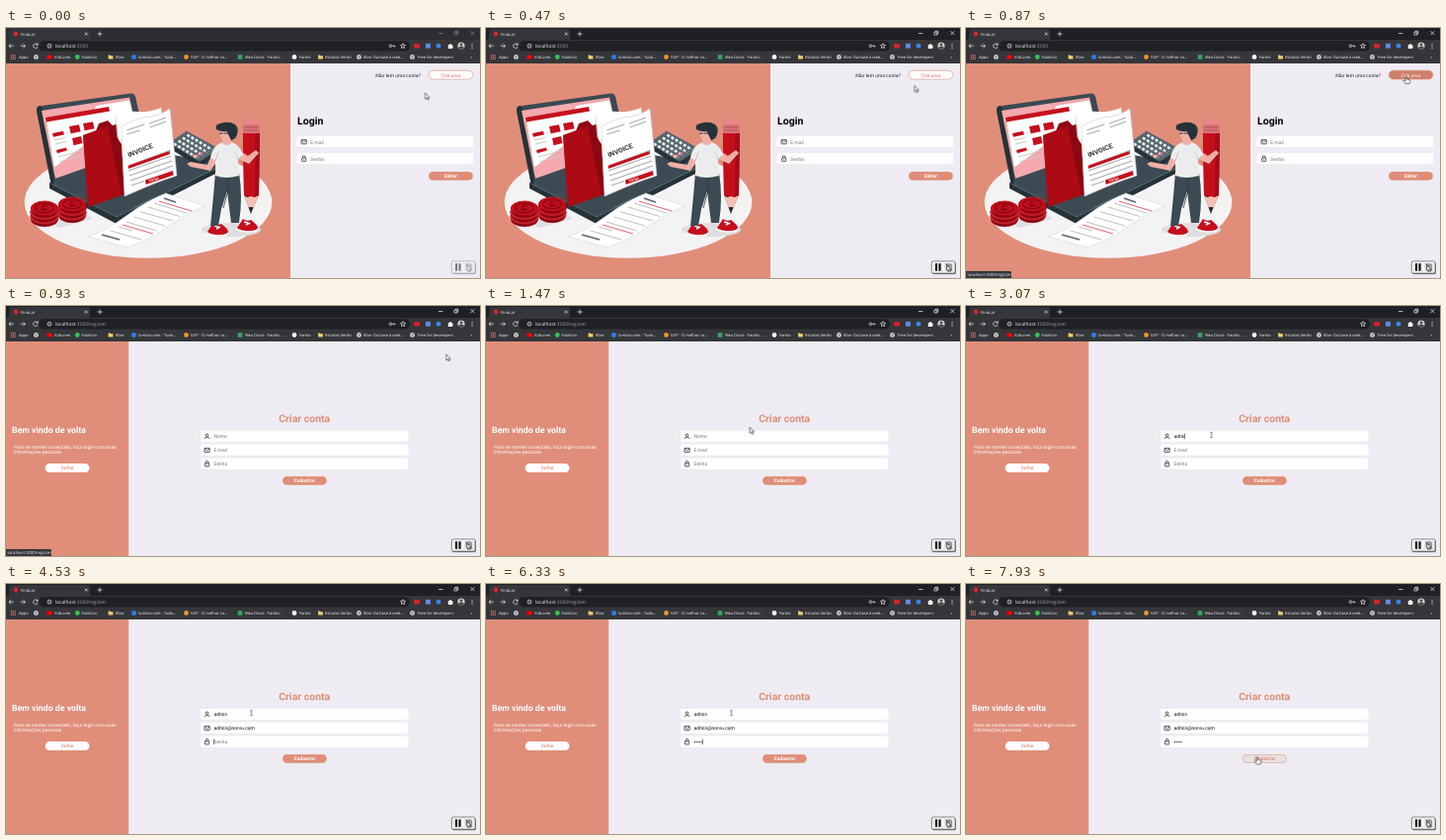
An HTML page that plays this animation: 480 px wide and 254 px high, repeating every 8 s.

```html
<!DOCTYPE html>
<html lang="pt-BR">
<head>
<meta charset="utf-8">
<title>Criar conta</title>
<style>
html, body { margin: 0; width: 100%; height: 100%; overflow: hidden; background: #eeecf2; }
svg { display: block; width: 100vw; height: 100vh; }
text { font-family: Roboto, sans-serif; font-size: 4.92px; text-rendering: geometricPrecision; white-space: pre; }
.ui text { font-family: "Open Sans", "Noto Sans", sans-serif; fill: #f4f5f6; }
.marks text { font-size: 4px; font-weight: 500; }
.line { fill: none; stroke: #f1f2f3; stroke-width: .7; }
.ink { fill: none; stroke: #222; stroke-width: .75; }
.hint { fill: #777; }
.mid { text-anchor: middle; }
.b { font-weight: 700; }
.salmon { fill: #e08e79; }
.w { fill: #fff; }
.red { fill: #c40f1d; }
.deep { fill: #8c0812; }
.fold { fill: #ac0b15; }
.slate { fill: #3b4a53; }
.dark { fill: #263238; }
.skin { fill: #f0b0a6; }

/* 8 s loop: 1% = 80 ms */
.t { animation: 8s step-end infinite; }
.strip { fill: #2d2e31; animation-name: strip; }
.controls { opacity: .45; animation-name: controls; }
.login { animation-name: login; }
.reg { opacity: 0; animation-name: reg; }
.key { animation-name: key; }
.status { opacity: 0; animation-name: status; }
.popup { opacity: 0; animation-name: popup; }
.hint1 { animation-name: hint1; }
.hint2 { animation-name: hint2; }
.hint3 { animation-name: hint3; }
.mail { opacity: 0; animation-name: mail; }
.name { animation-name: name; }
.pass { animation-name: pass; }
.caret { opacity: 0; animation-name: caret; }
.arrow { animation-name: arrow; }
.hand { opacity: 0; animation-name: hand; }
.beam { opacity: 0; animation-name: beam; }
.move { animation: move 8s ease-in-out infinite; }
.rec { animation: rec 8s linear infinite; }
.go { fill: #fff; animation: go 8s linear infinite; }
.goText { fill: #e08e79; animation: goText 8s linear infinite; }
.send { fill: #e08e79; animation: send 8s linear infinite; }
.sendText { fill: #fff; animation: sendText 8s linear infinite; }

@keyframes strip { 1.6% { fill: #1f2023 } }
@keyframes controls { 1.6% { opacity: 1 } }
@keyframes login { 11.6% { opacity: 0 } }
@keyframes reg { 11.6% { opacity: 1 } }
@keyframes key { 27.4% { opacity: 0 } 66.6% { opacity: 1 } }
@keyframes status { 9.1% { opacity: 1 } 15% { opacity: .5 } 15.8% { opacity: 0 } }
@keyframes popup { 23.3% { opacity: .5 } 24.1% { opacity: 1 } 27.4% { opacity: 0 } }
@keyframes hint1 { 27.4% { opacity: 0 } }
@keyframes hint2 { 50.8% { opacity: 0 } }
@keyframes hint3 { 65.8% { opacity: 0 } }
@keyframes mail { 50.8% { opacity: 1 } }
@keyframes name {
  27.4% { transform: translateX(2.7px) } 29.9% { transform: translateX(5.4px) }
  34.1% { transform: translateX(9.8px) } 38.3% { transform: translateX(11px) }
  40.8% { transform: translateX(13.7px) }
}
@keyframes pass {
  65.8% { transform: translateX(2.2px) } 69.1% { transform: translateX(4.4px) }
  73.3% { transform: translateX(6.6px) } 79.1% { transform: translateX(8.8px) }
}
@keyframes caret {
  23.3% { opacity: 1; transform: none }
  27.4% { opacity: 1; transform: translate(2.7px, 0) }
  29.9% { opacity: 1; transform: translate(5.4px, 0) }
  34.1% { opacity: 1; transform: translate(9.8px, 0) }
  38.3% { opacity: 1; transform: translate(11px, 0) }
  40.8% { opacity: 1; transform: translate(13.7px, 0) }
  43.3% { opacity: 1; transform: translate(0, 14px) }
  49.9% { opacity: 0; transform: translate(0, 14px) }
  50.8% { opacity: 1; transform: translate(41.6px, 14px) }
  56.6% { opacity: 1; transform: translate(0, 28px) }
  63.3% { opacity: 0; transform: translate(0, 28px) }
  65.8% { opacity: 1; transform: translate(2.2px, 28px) }
  69.1% { opacity: 1; transform: translate(4.4px, 28px) }
  73.3% { opacity: 1; transform: translate(6.6px, 28px) }
  79.1% { opacity: 1; transform: translate(9px, 28px) }
  85.8% { opacity: 0; transform: translate(9px, 28px) }
  92.4% { opacity: 1; transform: translate(9px, 28px) }
  98.3% { opacity: 0; transform: translate(9px, 28px) }
}
@keyframes move {
  0%, 1.6% { transform: translate(424.5px, 66px) }
  10.8%, 12.5% { transform: translate(445.7px, 49px) }
  20%, 90% { transform: translate(248.5px, 131px) }
  98.4%, 100% { transform: translate(295px, 175.5px) }
}
@keyframes arrow { 9.1% { opacity: 0 } 11.6% { opacity: 1 } 19% { opacity: 0 } 95% { opacity: 1 } 95.8% { opacity: 0 } }
@keyframes hand { 9.1% { opacity: 1 } 11.6% { opacity: 0 } 95.8% { opacity: 1 } }
@keyframes beam { 19% { opacity: 1 } 95% { opacity: 0 } }
@keyframes rec { 0%, 1.6% { opacity: .5 } 5%, 100% { opacity: 1 } }
@keyframes go { 0%, 9.1% { fill: #fff } 10.8%, 100% { fill: #cf7f6b } }
@keyframes goText { 0%, 9.1% { fill: #e08e79 } 10.8%, 100% { fill: #fbdcd4 } }
@keyframes send { 0%, 95.8% { fill: #e08e79 } 98%, 100% { fill: #e7e0e2 } }
@keyframes sendText { 0%, 95.8% { fill: #fff } 98%, 100% { fill: #e08e79 } }
</style>
</head>
<body>
<svg viewBox="0 0 480 254" preserveAspectRatio="none">
<defs>
  <g id="mailIcon" class="ink"><rect x="-2.6" y="-2.1" width="5.2" height="4.2" rx=".5"/><path d="M-2.5-1.7 0 .4 2.5-1.7"/></g>
  <g id="lockIcon" class="ink"><rect x="-2.1" y="-.7" width="4.2" height="3.4" rx=".5"/><path d="M-1.3-.7V-1.6a1.3 1.3 0 0 1 2.6 0v.9M0 .6v.8"/></g>
  <g id="userIcon" class="ink"><circle cy="-1.3" r="1.3"/><path d="M-2.4 2.7V2.2Q-2.4.9 0 .9T2.4 2.2v.5"/></g>
  <g id="globe"><circle r="2.4" fill="#e4e5e7"/><path d="M-1.6-.9 0-.3.3 1.2-.5 1.9M.6-1.7 1.7-.2" fill="none" stroke="#35363a" stroke-width=".7"/></g>
  <path id="folder" d="M-2.4-1.9h1.9l.6.7h2.3v3.1h-4.8z" fill="#f3cf6b"/>
  <g id="coins">
    <path class="deep" d="M-14 0V11a14 8 0 0 0 28 0V0z"/>
    <path d="M-14 3a14 8 0 0 0 28 0M-14 7.500a14 8 0 0 0 28 0" fill="none" stroke="#c8222e" stroke-width="2"/>
    <ellipse class="red" rx="14" ry="7.500"/>
    <ellipse rx="9.500" ry="4.800" fill="none" stroke="#840813" stroke-width="1.200"/>
    <path d="M3-2.200Q-3-3.500-2.500-.8T2 1.200-3 2.400" fill="none" stroke="#840813" stroke-width="1.300"/>
  </g>
  <g id="shoe">
    <path class="red" d="M-9 4l6-9q4 3 8 1 7 5 7 8 0 3-7 3h-12z"/>
    <path d="M-10 5q5 3 14 3 7 0 8-3M-2-2l4 1M0 1l4-2" fill="none" stroke="#fff" stroke-width="1.500"/>
  </g>
</defs>

<!-- browser -->
<g class="ui">
  <path d="M0 0h480v36H0z" fill="#35363a"/>
  <path class="t strip" d="M0 0h480v12H0z"/>
  <path d="M1 12q2 0 2-2V3q0-2 2-2h78q2 0 2 2v7q0 2 2 2z" fill="#35363a"/>
  <circle cx="10" cy="6" r="2.4" fill="#d4232f"/>
  <text x="15" y="7.6" style="font-size:4.2px">FinoLar</text>
  <path class="line" d="M79.8 4.5l3 3m0-3l-3 3M92.5 6h5M95 3.5v5"/>
  <path class="line t controls" d="M438 5.500h4.500M470.500 3.200l3.800 3.800m0-3.800l-3.800 3.800M454 4.200h2.800V7H454zM455 4.200v-1h2.800V6h-1"/>
  <rect x="33" y="13" width="376" height="10.4" rx="5.2" fill="#202124"/>
  <path class="line" d="M8 18.2H3m2.2-2.2L3 18.2l2.2 2.2M14.5 18.2h5m-2.2-2.2l2.2 2.2-2.2 2.2M32 17a2.3 2.3 0 1 0 .2 2M32.3 15.5v1.8h-1.8"/>
  <circle class="line" cx="44" cy="18.2" r="2"/><path class="line" d="M44 18v1.2M44 16.8v.5"/>
  <text x="50" y="20">localhost<tspan fill="#9a9da2">:3000</tspan></text>
  <text class="t reg" x="82.4" y="20" style="fill:#9a9da2">/register</text>
  <g class="t key"><circle class="line" cx="389.4" cy="18.2" r="1.3"/><path class="line" d="M390.7 18.2h3.3v1.2m-1.3-1.2v1"/></g>
  <path class="line" d="M402 15.7l.7 1.6 1.8.2-1.4 1.2.4 1.8-1.5-.9-1.5.9.4-1.8-1.4-1.2 1.8-.2z"/>
  <rect x="413" y="16" width="6" height="4.400" rx="1" fill="#d3222c"/>
  <rect x="425" y="15.8" width="4.8" height="4.8" fill="#5b8def"/>
  <circle cx="438" cy="18.2" r="2.4" fill="#3f83e8"/>
  <path d="M447.8 17h1.2a1 1 0 0 1 2 0h1.2v1.3a1 1 0 0 1 0 1.8v1h-4.4z" fill="#f4f5f6"/>
  <circle cx="461" cy="18" r="3.6" fill="#d6d0cc"/>
  <path d="M458 20.200q.5-1.800 3-1.800t3 1.800q-3 2.600-6 0z" fill="#4b4646"/><circle cx="461" cy="16.900" r="1.300" fill="#4b4646"/>
  <path d="M472 15.9v5" stroke="#f4f5f6" stroke-width="1" stroke-dasharray="1 1"/>

  <g class="marks">
    <path d="M4.8 27.7h5M4.8 29.5h5M4.8 31.3h5" stroke="#d9776a" stroke-width="1.2" stroke-dasharray="1.2 .7"/>
    <text x="13" y="31">Apps</text>
    <use href="#globe" x="30.5" y="29.5"/>
    <rect x="41.4" y="27.6" width="5.2" height="3.8" fill="#f00"/><text x="49" y="31">VidLume</text>
    <circle cx="72.3" cy="29.5" r="2.4" fill="#2bc655"/><text x="76.5" y="31">FalaVivo</text>
    <use href="#folder" x="106" y="29.5"/><text x="111" y="31">Elixir</text>
    <circle cx="129.5" cy="29.5" r="2.5" fill="#2f7fe0"/><text x="134" y="31">lumbra.com - Tudo...</text>
    <circle cx="182.5" cy="29.5" r="2.4" fill="#e8962e"/><text x="187" y="31">VUP - O melhor co...</text>
    <rect x="234.7" y="27.2" width="4.6" height="4.6" fill="#35a562"/><text x="242" y="31">Meu Disco - Farolo...</text>
    <circle cx="292" cy="29.5" r="2.4" fill="#eef0f2"/><text x="297" y="31">Farolo</text>
    <use href="#folder" x="318.5" y="29.5"/><text x="323" y="31">Estudos Verão</text>
    <use href="#globe" x="357.5" y="29.5"/><text x="362" y="31">Elixir Da base à web...</text>
    <use href="#globe" x="411.5" y="29.5"/><text x="417" y="31">Free for developers</text>
    <text x="470.5" y="31">»</text>
  </g>
</g>

<!-- login page -->
<g class="t login">
  <path d="M0 36h480v218H0z" fill="#eeecf2"/>
  <path class="salmon" d="M0 36h288v218H0z"/>
  <ellipse cx="144" cy="177" rx="125.300" ry="56.800" fill="#f4f3f4"/>
  <ellipse cx="228" cy="205" rx="30" ry="7" fill="#dfdddf"/>
  <path d="M28 192l26 11 34-9-10-8z" fill="#dfdddf"/>

  <!-- laptop -->
  <path class="dark" d="M44 157L112 191 222 138v5L112 199 44 163z"/>
  <path class="slate" d="M44 157L134 123 222 138 112 192z"/>
  <path d="M44 157.300L112 192 222 138" fill="none" stroke="#687a84" stroke-width=".7"/>
  <path class="slate" d="M31 84q-.5-4 3-4.700L126 66.500q4-.7 5 3L143 124 46 160z"/>
  <path class="dark" d="M31 84q-.5-4 3-4.700l3 2L49 155l-3 5z"/>
  <path d="M36 84l89-13.500L137 122 50 153z" fill="#f3a9ad"/>
  <path class="w" d="M41 94l48-8 2-7 34-5.500 6 27-40 10-42 31z"/>
  <path class="red" d="M40 91l64-11 1 4.500-64 11zM64 100l10-1.800 1.600 7-10 2zM78 97l10-1.800 1.600 7-10 2zM67 112l9-2 1.500 7-9 2.300zM47 107l11-2.300 1 3.500-11 2.500zM51 124l10-2.500.8 3-10 2.800z"/>
  <path d="M49 114l11-2.500M50 118l11-2.800M53 131l22-6M54 136l22-6.500" stroke="#d2c6c9" stroke-width="1"/>
  <path d="M128 182l22-10 14 4-22 11z" fill="#50616b"/>

  <!-- calculator -->
  <path class="dark" d="M165 117l18-12 33 18v5l-20 13-31-19z"/>
  <path d="M165 117l18-12 33 18-20 13z" fill="#55666f"/>
  <path d="M170 117.500l25 15M174.500 114.500l25 15M179 111.500l25 15M183.500 108.500l25 15" stroke="#f1f1f1" stroke-width="2.600" stroke-dasharray="3 1.800"/>
  <path d="M188 128.500l4 2.500 9-6" fill="none" stroke="#e7838a" stroke-width="2.600" stroke-dasharray="3 1.800"/>

  <!-- folder and sheets -->
  <path class="deep" d="M78 109l13-4 3-8 9-3 5 5 20-7 6 72-50 17z"/>
  <path class="w" d="M111 90q10-6 22-5t24-4l9 62-47 20z"/>
  <path d="M111 90l6 73" stroke="#c9c9cd" stroke-width=".7"/>
  <path class="fold" d="M78 109l24-9q3 0 5 4l13 65-37 13z"/>
  <path class="deep" d="M102 96l15 22 3 51-3 1z"/>
  <path class="w" d="M117 100q12-8 24-9t25-9l7 68q-13 4-25 9t-28 12z" stroke="#c9c9cd" stroke-width=".6"/>
  <path d="M122 104l18-6M122.500 108l13-4M145 97l17-6M146 101l16-6M124 140l43-16M124 145l43-15M125 150l43-15M126 155l43-15M127 160l13-4.500" stroke="#a9abb2" stroke-width="1.100"/>
  <text class="b dark" transform="translate(124.500 131.500) rotate(-22)" style="font-size:6.900px">INVOICE</text>
  <path class="red" d="M123.500 140l42-15 .5 3-42 15zM141 154.500l28-9.500.6 4.500-28 9.500z"/>
  <text class="b w" transform="translate(145 157) rotate(-19)" style="font-size:3.600px">TOTAL</text>
  <path class="w" d="M83 212q20-7 40-22t39-22l40 13q-18 6-37 20t-42 22z" stroke="#d2d2d7" stroke-width=".6"/>
  <path d="M150 178l33 10M144 182l32 9.500M137 187l32 9M130 192l31 9M122 197l31 9M114 202l14 4M106 206l31 9" stroke="#bfbfc6" stroke-width="1"/>
  <path d="M160 173l12 4M97 210l18 5" stroke="#5a646b" stroke-width="1.400"/>
  <path d="M155 176l33 10M118 200l31 9" stroke="#d9626b" stroke-width="1"/>

  <use href="#coins" x="67" y="179"/>
  <use href="#coins" x="39" y="183"/>

  <!-- pencil -->
  <path class="deep" d="M240 106h17l-1 64-8 18-7-18z"/>
  <path class="red" d="M240 106h6v64h-5zM246 106h6v65l-6 1z"/>
  <path d="M252 106h5l-1 64-4 1z" fill="#a80c19"/>
  <path d="M241 170l3 2 4-1 4 1 4-2-8 19z" fill="#f2c3b6"/><path class="dark" d="M245.500 182h5l-2.500 7z"/>
  <path d="M241 97q0-5 7.500-5t7.500 5v4h-15z" fill="#e8868e"/>
  <path d="M240.500 98h16v9h-16z" fill="#d9727b"/><path d="M240.500 101h16M240.500 104h16" stroke="#b04b55" stroke-width=".8"/>

  <!-- man -->
  <use href="#shoe" x="213" y="203"/>
  <use href="#shoe" x="243" y="199"/>
  <path class="slate" d="M212 147h24q4 24 0 51h-8l-4-32-6 18-3 17h-8l3-30z"/>
  <path d="M224 152l1 13-5 18" fill="none" stroke="#2b3840" stroke-width=".8"/>
  <path class="skin" d="M209 127l-5 12-17-3-4 2 4 3 20 4 10-14zM236 124l9 6 8-6 3 3-10 11-13-6z"/>
  <path d="M217 117q8-3 14 0 7 4 9 12l-5 4 1 17q-13 4-24 0v-16l-5-2q2-12 10-15z" fill="#ececee"/>
  <path d="M235 133l-3-7M212 135l3-9" stroke="#c0c0c6" stroke-width=".7"/>
  <path class="skin" d="M219 111l9 2v4q-4 4-9 0z"/>
  <path class="skin" d="M216 103h11v9q-3 4-7 2-4-3-4-11z"/>
  <path class="dark" d="M213 103q-2-5 4-6 9-3 15 1 4 4 2 10-1 5-6 6l-3-6-1-3q-6 1-11-2z"/>
  <path d="M216 107h4m1 0h4" stroke="#263238" stroke-width="1.200"/>

  <text x="374.3" y="49.5" fill="#222">Não tem uma conta?</text>
  <rect class="go" x="428.200" y="43.200" width="44.600" height="8.900" rx="4.450" stroke="#e08e79" stroke-width=".6"/>
  <text class="mid goText" x="450.400" y="49.500" font-weight="500">Crie uma</text>
  <text class="b" x="295" y="97.600" style="font-size:10.530px">Login</text>
  <rect class="w" x="294.500" y="110" width="178.500" height="11" rx="1.800"/>
  <rect class="w" x="294.500" y="127.300" width="178.500" height="11" rx="1.800"/>
  <use href="#mailIcon" x="301.700" y="115.700"/><use href="#lockIcon" x="301.700" y="132.700"/>
  <text class="hint" x="308.300" y="117.500">E-mail</text>
  <text class="hint" x="308.300" y="134.800">Senha</text>
  <rect class="salmon" x="428" y="145.900" width="44.800" height="8.900" rx="4.450"/>
  <text class="mid b w" x="450.400" y="152.200">Entrar</text>
</g>

<!-- register page -->
<g class="t reg">
  <path d="M0 36h480v218H0z" fill="#eeecf2"/>
  <path class="salmon" d="M0 36h124.200v218H0z"/>
  <text class="b w" x="6" y="129.300" style="font-size:8.780px">Bem vindo de volta</text>
  <text class="w" x="8" y="144.700">Para se manter conectado, faça login com suas</text>
  <text class="w" x="8" y="150.400">informações pessoais</text>
  <rect class="w" x="39.700" y="160.100" width="44.800" height="8.900" rx="4.450"/>
  <text class="mid salmon" x="62.300" y="166.400" font-weight="500">Voltar</text>
  <text class="b mid salmon" x="302.200" y="118.100" style="font-size:10.530px">Criar conta</text>
  <rect class="w" x="197" y="126.800" width="210.500" height="11" rx="1.800"/>
  <rect class="w" x="197" y="140.800" width="210.500" height="11" rx="1.800"/>
  <rect class="w" x="197" y="154.800" width="210.500" height="11" rx="1.800"/>
  <use href="#userIcon" x="203.600" y="132.400"/><use href="#mailIcon" x="203.600" y="146.500"/><use href="#lockIcon" x="203.600" y="160.300"/>

  <text x="210.500" y="134.300">admin</text>
  <rect class="t name w" x="210.300" y="128" width="16" height="9"/>
  <text class="t mail" x="210.500" y="148.300">admin@norvu.com</text>
  <path d="M211.600 160.500h8" stroke="#111" stroke-width="1.300" stroke-linecap="round" stroke-dasharray=".01 2.200"/>
  <rect class="t pass w" x="210.300" y="156" width="11" height="9"/>
  <text class="t hint hint1" x="210.500" y="134.300">Nome</text>
  <text class="t hint hint2" x="210.500" y="148.300">E-mail</text>
  <text class="t hint hint3" x="210.500" y="162.300">Senha</text>
  <rect class="t caret" x="210.300" y="129.600" width=".5" height="5.600"/>

  <rect class="send" x="280.300" y="173.300" width="44.200" height="8.400" rx="4.200" stroke="#e08e79" stroke-width=".6"/>
  <text class="mid b sendText" x="302.400" y="179.300">Cadastrar</text>

  <g class="t popup ui">
    <rect x="207" y="138.3" width="67.5" height="40.5" rx="1.2" fill="#222327"/>
    <text x="211" y="149.2">Fabiano Reis Caldonati</text>
    <text x="211" y="156.3" style="font-size:4.3px">fabianorc_@norvu.com</text>
    <path d="M207 163.8h67.5" stroke="#3c3d42" stroke-width=".5"/>
    <text x="211" y="172.8" style="font-size:4.5px">Gerenciar...</text>
  </g>
</g>

<g class="t status ui">
  <path d="M0 247h44.5q1.500 0 1.500 1.500V254H0z" fill="#35363a"/>
  <text x="1.5" y="252" style="font-size:4.2px">localhost:3000/register</text>
</g>

<!-- recorder control -->
<g class="rec">
  <rect x="452" y="238" width="24" height="12.300" rx="1.500" opacity=".45"/>
  <rect x="451.300" y="237" width="23.600" height="12" rx="1.300" fill="#e6e6e8" stroke="#444" stroke-width=".7"/>
  <path d="M452.300 238h10.300v10h-10.300zM463.600 238h10.300v10h-10.300z" fill="none" stroke="#fff" stroke-width=".8"/>
  <path d="M455 239.300h2v7.400h-2zM458.500 239.300h2v7.400h-2z"/>
  <g class="ink"><rect x="466.300" y="240" width="4.800" height="6" rx="1"/><path d="M467.300 242h2.800M465.500 239.500l6.500 7.200M467 247h4"/></g>
</g>

<!-- pointer -->
<g class="move">
  <path class="t arrow" d="M0 0V6.200L1.500 4.900 2.500 7.100 3.400 6.700 2.500 4.600H4.400z" fill="#fff" stroke="#222" stroke-width=".6"/>
  <path class="t hand" d="M-.7.600Q0-.5.700.600V3l2.700.7q.8.300.6 1.300L3.300 7.500H-.8L-2.900 4.600q.3-1 1.300-.2l.9.700z" fill="#fff" stroke="#222" stroke-width=".6"/>
  <path class="t beam" d="M-1.200-2.800Q0-2.800 0-2.200V2.200Q0 2.800-1.200 2.800M1.200-2.800Q0-2.800 0-2.200M0 2.200Q0 2.800 1.200 2.800" fill="none" stroke="#222" stroke-width=".6"/>
</g>
</svg>
</body>
</html>
```
